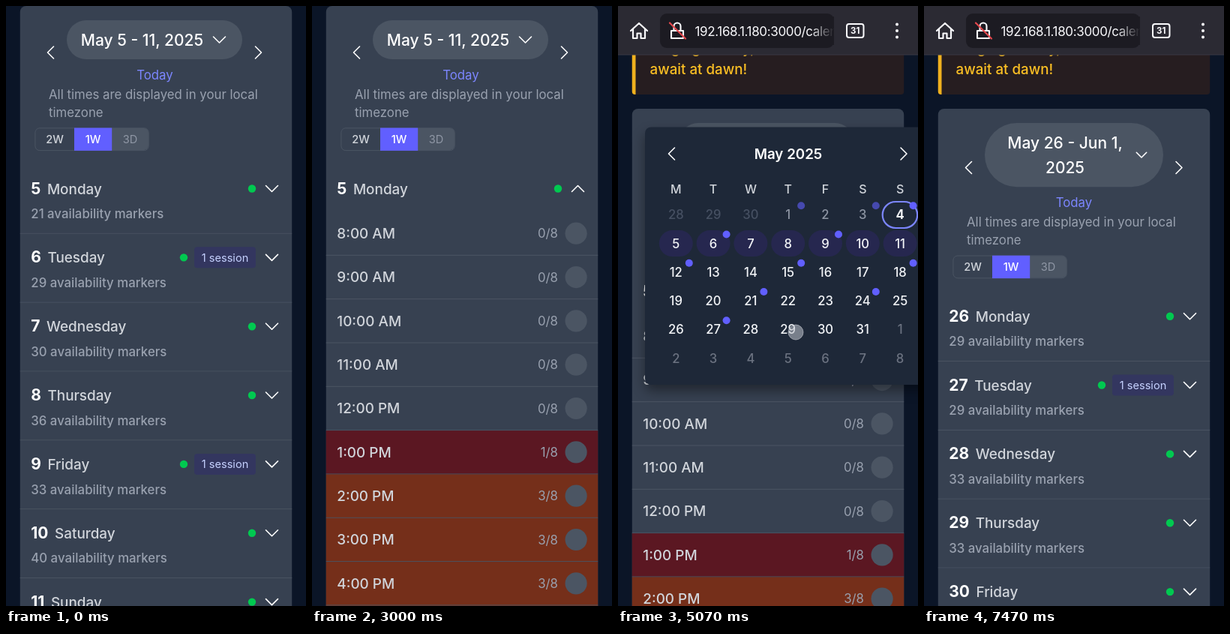
Recreate the animation shown at these times as an HTML page. Size 400x800 px, loop 8000 ms.

```html
<!DOCTYPE html>
<html lang="en">
<head>
<meta charset="utf-8">
<title>Availability calendar</title>
<style>
html, body { margin: 0; width: 100%; height: 100%; overflow: hidden; background: #0b1527; }
svg { display: block; font-family: Inter, Roboto, sans-serif; }
#picker { filter: drop-shadow(0 8px 8px #0006); }
#url { letter-spacing: -.35px; }
</style>
</head>
<body>
<svg id="stage" width="400" height="800" viewBox="0 0 400 800"></svg>
<script>
const LOOP = 8000;
const CLOSED = 91.85, HEAD = 62.5, ROW = 58.33, HOURS = 14, FIRST = 212, WRAP = 33.2;
const OPEN = HEAD + HOURS * ROW;
const BIG = 21, MID = 18.9, BODY = 16.8, SMALL = 14.6;
const CARD = '#374151', LINE = '#4b5563', LIGHT = '#d1d5db', MUTED = '#99a1af', INDIGO = '#615fff', SOFT = '#7c86ff';
const NAMES = ['Monday', 'Tuesday', 'Wednesday', 'Thursday', 'Friday', 'Saturday', 'Sunday'];

const $ = id => document.getElementById(id);
const text = (x, y, s, size, fill, weight = 400, anchor = 'start') =>
  `<text x="${x}" y="${y + size * .364}" font-size="${size}" fill="${fill}" font-weight="${weight}" text-anchor="${anchor}">${s}</text>`;
const rect = (x, y, w, h, fill, r = 0, more = '') =>
  `<rect x="${x}" y="${y}" width="${w}" height="${h}" rx="${r}" fill="${fill}" ${more}/>`;
const disc = (x, y, r, fill, more = '') => `<circle cx="${x}" cy="${y}" r="${r}" fill="${fill}" ${more}/>`;
const stroke = (d, color = '#fff', w = 1.6) =>
  `<path d="${d}" fill="none" stroke="${color}" stroke-width="${w}" stroke-linecap="round" stroke-linejoin="round"/>`;
const down = (x, y, w = 8) => stroke(`M${x - w} ${y - w / 2}l${w} ${w}l${w} ${-w}`);
const side = (x, y, d) => stroke(`M${x - 4 * d} ${y - 8}l${8 * d} 8l${-8 * d} 8`);

// Card header; a long range wraps to two lines and pushes the rest down.
function header(lines) {
  const extra = (lines.length - 1) * WRAP, long = extra > 0;
  const mid = 45 + extra / 2, arrow = long ? 78.5 : 62;
  const label = long
    ? lines.map((s, i) => text(188, 45.5 + i * WRAP, s, BIG, '#fff', 500, 'middle')).join('')
    : text(99.8, 45.5, lines[0], BIG, '#fff', 500);
  return rect(81, 19, long ? 238 : 234, 52 + extra, LINE, 26 + extra / 2) + label +
    down(long ? 290 : 284.5, mid, long ? 6.7 : 8) +
    side(59.5, arrow, -1) + side(long ? 340 : 336.5, arrow, 1) +
    text(long ? 200 : 198.5, 92 + extra, 'Today', BODY, SOFT, 400, 'middle') +
    `<g transform="translate(0 ${extra})">` +
    text(57, 117.5, 'All times are displayed in your local', BODY, MUTED) +
    text(57, 141.5, 'timezone', BODY, MUTED) +
    `<path d="M141 163h43a6 6 0 0 1 6 6v17a6 6 0 0 1-6 6h-43z" fill="${LINE}"/>` +
    rect(38.9, 162.8, 151.3, 29.8, 'none', 6, `stroke="${LINE}"`) +
    rect(91, 162.5, 50.2, 30.4, INDIGO) +
    text(65, 177.7, '2W', SMALL, LIGHT, 500, 'middle') +
    text(116, 177.7, '1W', SMALL, '#fff', 500, 'middle') +
    text(165.5, 177.7, '3D', SMALL, '#8f97a5', 400, 'middle') + '</g>';
}

function hourRow(i, count) {
  const y = i * ROW, mid = y + 28.7, hour = 8 + i;
  const fill = count > 1 ? '#752f1a' : count ? '#5b1722' : '';
  return (fill ? rect(18.75, y, 362.5, ROW, fill) : '') +
    rect(18.75, y + ROW - 1, 362.5, 1, LINE) +
    text(33.3, mid, `${(hour - 1) % 12 + 1}:00 ${hour < 12 ? 'AM' : 'PM'}`, MID, LIGHT, 500) +
    text(328, mid, count + '/8', BODY, MUTED, 400, 'end') + disc(352.1, mid, 14.6, LINE);
}

// counts: sessions wanted from 1 PM on
function day(id, date, name, markers, session, counts) {
  const rows = counts ? Array.from({ length: HOURS }, (_, i) =>
    hourRow(i, i < 5 ? 0 : counts[Math.min(i - 5, counts.length - 1)])).join('') : '';
  const label = `<tspan fill="#fff" font-size="${BIG}" font-weight="700">${date}</tspan><tspan dx="8.5">${name}</tspan>`;
  return `<svg id="${id}" width="400" height="${CLOSED}">` +
    text(33.3, 31.7, label, MID, LIGHT, 500) +
    (session ? rect(251, 17.5, 82, 28, '#33365f', 4) + text(292, 31.5, '1 session', SMALL, '#c6d2ff', 400, 'middle') : '') +
    disc(session ? 237 : 328, 31.5, 5.2, '#00c950') +
    `<g class="chev">${down(0, 0)}</g>` +
    `<g class="sub">${text(33.3, 65, markers + ' availability markers', BODY, MUTED, 500)}</g>` +
    `<g class="rows" transform="translate(0 ${HEAD})">${rows}</g>` +
    `<rect class="edge" x="18.75" width="362.5" height="1" fill="${LINE}"/></svg>`;
}

function week(id, start, markers, sessions, counts) {
  return NAMES.map((n, i) =>
    day(id + i, (start + i - 1) % 31 + 1, n, markers[i], sessions.includes(i), counts[i])).join('');
}

function picker() {
  const cx = i => 77.3 + i * 49.8, cy = r => 278.3 + r * 38.25;
  const chosen = (id, r) => `<g id="${id}">` + NAMES.map((_, i) =>
    rect(cx(i) - 22.5, cy(r) - 17.5, 45, 35, '#26274f', 17.5)).join('') + '</g>';
  let s = rect(36, 161.5, 390, 343.5, '#1e2838', 8) + side(71.5, 197, -1) + side(381, 197, 1) +
    text(227, 197.3, 'May 2025', 18.75, '#fff', 600, 'middle') + chosen('weekA', 1) + chosen('weekB', 4) +
    rect(352.7, 261, 46.5, 35, 'none', 17.5, `stroke="${SOFT}" stroke-width="2.2"`);
  [...'MTWTFSS'].forEach((c, i) => s += text(cx(i), 244.5, c, 16, LIGHT, 500, 'middle'));
  for (let k = 0; k < 42; k++) {
    const n = k - 2, x = cx(k % 7), y = cy(Math.floor(k / 7)), inside = n > 0 && n < 32;
    const color = n < 1 ? '#465062' : n > 31 ? '#6b7280' : n < 4 ? '#8d95a3' : '#f1f3f6';
    if (inside && (n % 3 === 0 && n < 30 || n === 1 || n === 4))
      s += disc(x + 17.5, y - 12, 5, INDIGO, n < 4 ? 'opacity=".6"' : '');
    s += text(x, y, n < 1 ? n + 30 : inside ? n : n - 31, 16.67, color, n === 4 ? 700 : 500, 'middle');
  }
  return s;
}

const toolbar = rect(0, 0, 400, 65, '#2b2a33') + rect(0, 64.5, 400, 1, '#3a3944') +
  rect(56, 10, 232, 46, '#1c1b22', 9) +
  stroke('M17 33L28 23L39 33M20 31V43H25.5V36.5H30.5V43H36V31', '#fbfbfe', 2.2) +
  stroke('M71 33H87V43H71ZM74.5 33V27a4.5 4.5 0 0 1 9 0V33', '#fbfbfe', 2.1) +
  stroke('M69 22.5L90 43.5', '#e5484d', 2.2) +
  `<svg id="url" width="288" height="65">${text(102.5, 33.5, '192.168.1.180:3000/calendar', 17, '#fbfbfe')}</svg>` +
  rect(256, 14, 32, 38, 'url(#fade)') +
  rect(305, 24, 22.5, 18, 'none', 3, 'stroke="#fbfbfe" stroke-width="2"') +
  text(316.3, 33, '31', 11.5, '#fbfbfe', 700, 'middle') +
  [24.5, 33, 41.5].map(y => disc(372, y, 2, '#fbfbfe')).join('');

$('stage').innerHTML =
  '<defs><linearGradient id="fade"><stop stop-color="#1c1b22" stop-opacity="0"/><stop offset="1" stop-color="#1c1b22"/></linearGradient></defs>' +
  rect(0, 0, 400, 800, '#0b1527') +
  '<g id="page">' +
  rect(18.75, -130, 362.5, 111, '#261d20', 4) +
  '<path d="M23.5-130V-19H22.75a4 4 0 0 1-4-4V-130z" fill="#f0b11e"/>' +
  text(42.5, -81, 'Ringing victory,', 18.75, '#fbbf24', 500) +
  text(42.5, -52.5, 'await at dawn!', 18.75, '#fbbf24', 500) +
  rect(18.75, 0, 362.5, 1400, CARD, 8) +
  `<g id="first">${header(['May 5 - 11, 2025'])}` +
  week('a', 5, [21, 29, 30, 36, 33, 40, 38], [1, 4], { 0: [1, 3], 1: [1, 1, 2], 2: [1, 1, 2] }) + '</g>' +
  `<g id="second">${header(['May 26 - Jun 1,', '2025'])}` +
  week('b', 26, [29, 29, 33, 33, 33, 40, 38], [1], {}) + '</g></g>' +
  `<g id="picker">${picker()}</g><g id="bar">${toolbar}</g>` +
  rect(394, 0, 4, 0, '#6b7280', 2, 'id="thumb"') +
  disc(0, 0, 10, '#c3c7cf', 'id="touch" fill-opacity=".55" stroke="#dfe2e7" stroke-opacity=".5"');

const ramp = (t, a, b) => Math.min(1, Math.max(0, (t - a) / (b - a)));
const ease = p => p * p * (3 - 2 * p);
const smooth = (t, a, b) => ease(ramp(t, a, b));
const pulse = (t, a, b, c, d) => smooth(t, a, b) - smooth(t, c, d);
const set = (el, attrs) => { for (const k in attrs) el.setAttribute(k, attrs[k]); };

// start, end, x, y, follows the scroll
const taps = [
  [730, 860, 74, 435], [1400, 1540, 74, 345], [2530, 2680, 74, 277],
  [3270, 3530, 80, 147, true], [3880, 4020, 131, 192], [5000, 5150, 237, 435]
];
// fade in, fade out start, top, length
const thumbs = [[850, 1450, 106, 138], [3450, 4300, 151, 117], [5270, 5530, 169, 141]];

function layout(id, top, open) {
  NAMES.forEach((_, i) => {
    const p = open[i] || 0, h = CLOSED + (OPEN - CLOSED) * p, el = $(id + i);
    set(el, { y: top, height: h });
    set(el.querySelector('.chev'), { transform: `translate(354.5 31.5) scale(1 ${1 - 2 * p})` });
    set(el.querySelector('.sub'), { opacity: 1 - ramp(p, 0, .3) });
    set(el.querySelector('.rows'), { opacity: ramp(p, 0, .2) });
    set(el.querySelector('.edge'), { y: h - 1 });
    top += h;
  });
}

function draw(t) {
  const shift = Math.round(137 * (1 - (1 - ramp(t, 3270, 3910)) ** 3));
  set($('page'), { transform: `translate(0 ${shift})` });
  set($('bar'), { transform: `translate(0 ${Math.min(0, shift * .73 - 66)})` });

  const swapped = t >= 5270;
  set($('first'), { display: swapped ? 'none' : 'inline' });
  set($('second'), { display: swapped ? 'inline' : 'none' });
  layout('a', FIRST, [smooth(t, 2700, 3000), pulse(t, 1550, 1850, 2700, 3000), pulse(t, 850, 1070, 1550, 1850)]);

  const shown = pulse(t, 4130, 4330, 7060, 7330);
  set($('picker'), { opacity: shown, display: shown ? 'inline' : 'none' });
  const moved = smooth(t, 5170, 5300);
  set($('weekA'), { opacity: 1 - moved });
  set($('weekB'), { opacity: moved });

  const th = thumbs.find(b => t >= b[0] && t < b[1] + 200);
  set($('thumb'), th ? { y: th[2], height: th[3], opacity: .55 * pulse(t, th[0], th[0] + 120, th[1], th[1] + 200) } : { opacity: 0 });

  const tap = taps.find(k => t >= k[0] && t < k[1]);
  set($('touch'), tap ? { cx: tap[2], cy: tap[3] + (tap[4] ? shift : 0), opacity: 1 } : { opacity: 0 });
}

layout('b', FIRST + WRAP, []);
const begin = performance.now();
(function tick() {
  draw((performance.now() - begin) % LOOP);
  requestAnimationFrame(tick);
})();
</script>
</body>
</html>
```
